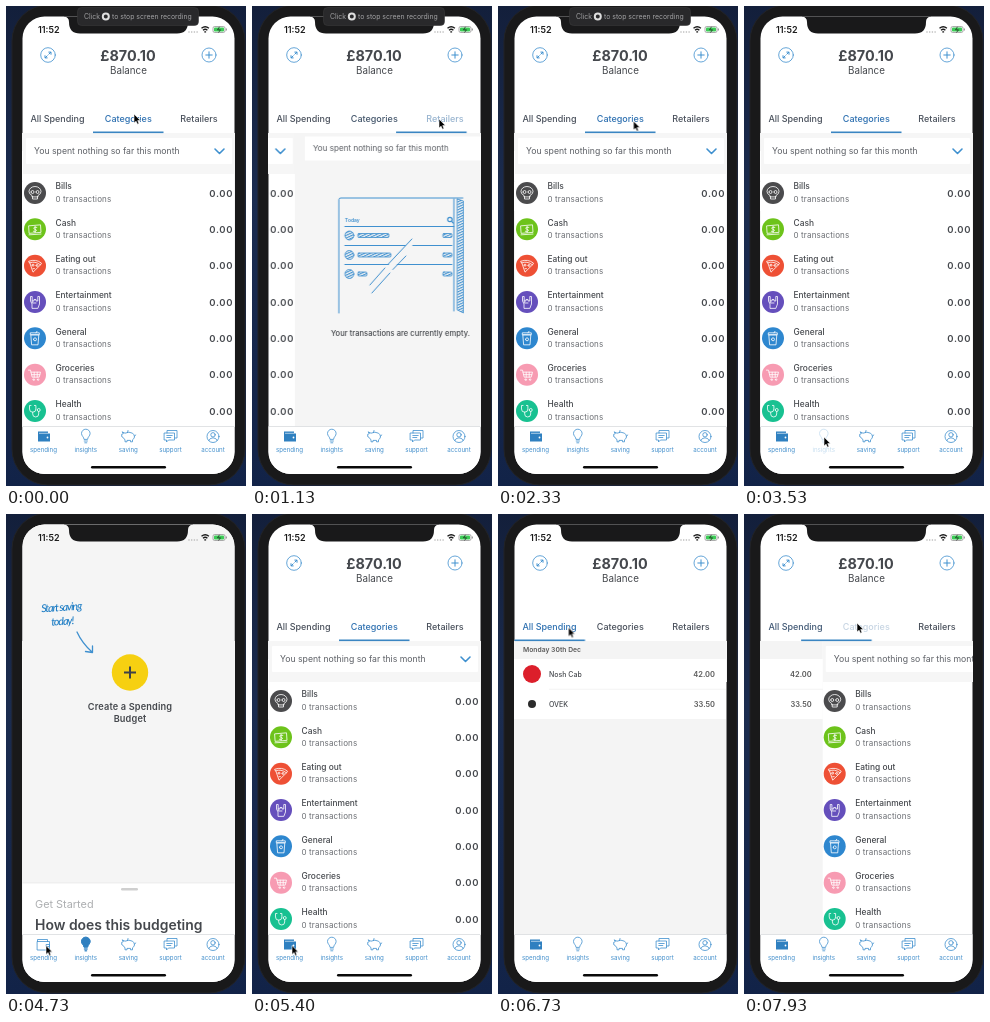
Recreate the animation shown at these times as an HTML page. Size 240 px wide and 480 px high, loop 7990 ms.

```html
<!DOCTYPE html>
<html lang="en">
<head>
<meta charset="utf-8">
<title>Spending app walkthrough</title>
<style>
html, body { margin: 0; width: 100%; height: 100%; overflow: hidden; background: #15213d; }
svg { display: block; }
text { font-family: Inter, "Open Sans", sans-serif; fill: #45484d; }
.mid { text-anchor: middle; }
.end { text-anchor: end; }
.line { fill: none; stroke: #3f90cf; stroke-linecap: round; stroke-linejoin: round; }
.thin { stroke-width: .8; }
.white { fill: none; stroke: #fff; stroke-width: .8; stroke-linecap: round; stroke-linejoin: round; }
.tab { font-size: 9px; font-weight: 500; text-anchor: middle; fill: #4a515c; }
.nav text { font-size: 6.2px; text-anchor: middle; fill: #4590cc; }
.name { font-size: 8.4px; font-weight: 500; }
.sub { font-size: 8px; letter-spacing: .15px; fill: #6a6d72; }
.sum { font-size: 9.5px; font-weight: 600; letter-spacing: .6px; }
.note { font-size: 8.7px; fill: #5c5f65; }
.shop { font-size: 7px; font-weight: 500; }
.paid { font-size: 7.5px; font-weight: 600; text-anchor: end; fill: #5a5a5a; }
.hand { font: italic 500 10.8px Lato, sans-serif; letter-spacing: -1.1px; fill: #1c7cc4; text-anchor: middle; }

/* One loop is 7990 ms for every part. */
.pager, .bar, .cursor, .pill, .tab, .insights, .press { animation: 7990ms linear infinite; }
.pager { animation-name: swipe; }
.bar { animation-name: bar; }
.pager, .bar { animation-timing-function: cubic-bezier(.65, 0, .35, 1); }
.cursor { animation-name: cursor; animation-timing-function: cubic-bezier(.45, 0, .4, 1); }
.pill { animation-name: pill; }
.all { animation-name: all-tap, all-on; }
.cat { animation-name: cat-tap, cat-on; }
.ret { animation-name: ret-tap, ret-on; }
.tab { animation-timing-function: linear, cubic-bezier(.65, 0, .35, 1); }
.insights, .press { animation-timing-function: step-end; }
.insights { animation-name: insights; }
.bulb { animation-name: bulb-tap; }
.wallet { animation-name: wallet-tap; }

@keyframes swipe {
  0%, 11.564% { transform: translateX(0); }
  15.319%, 24.155% { transform: translateX(-211px); }
  27.91%, 78.72% { transform: translateX(0); }
  82.48% { transform: translateX(211px); }
  97.08% { transform: translateX(211px); animation-timing-function: cubic-bezier(.333, 0, .667, 0); }
  98.957% { transform: translateX(105.5px); animation-timing-function: cubic-bezier(.333, .613, .667, .881); }
  100% { transform: translateX(9px); }
}
@keyframes bar {
  0%, 11.765% { transform: translateX(0); }
  15.52%, 24.356% { transform: translateX(70.5px); }
  28.11%, 78.924% { transform: translateX(0); }
  82.679% { transform: translateX(-70.5px); }
  97.285% { transform: translateX(-70.5px); animation-timing-function: cubic-bezier(.333, 0, .667, 0); }
  99.162% { transform: translateX(-35.25px); animation-timing-function: cubic-bezier(.333, .541, .667, .839); }
  100% { transform: translateX(-5.7px); }
}
@keyframes cursor {
  0%, 3.75% { transform: translate(128px, 108px); }
  10.64%, 16.9% { transform: translate(187px, 113px); }
  22.53%, 33.79% { transform: translate(135.5px, 115px); }
  42.55%, 53.44% { transform: translate(80px, 431px); }
  58.82%, 70.09% { transform: translate(40px, 431.5px); }
  76.72%, 80.1% { transform: translate(62px, 114px); }
  83.85%, 87.98% { transform: translate(70.5px, 113.5px); }
  90.99%, 100% { transform: translate(113px, 109px); }
}
@keyframes pill { 0%, 30.66% { opacity: 1; } 32.54%, 100% { opacity: 0; } }
@keyframes all-tap { 0%, 76.85% { opacity: 1; } 77.6%, 78.6% { opacity: .25; } 81.73%, 100% { opacity: 1; } }
@keyframes cat-tap {
  0%, 22.53% { opacity: 1; } 23.15%, 24.4% { opacity: .2; }
  27.53%, 95.87% { opacity: 1; } 96.62%, 99.25% { opacity: .28; } 100% { opacity: .4; }
}
@keyframes ret-tap {
  0%, 10.64% { opacity: 1; } 11.26%, 12.52% { opacity: .2; }
  14.14% { opacity: .5; } 15.77%, 100% { opacity: 1; }
}
@keyframes all-on { 0%, 78.924% { fill: #4a515c; } 82.679%, 98% { fill: #2f71b1; } 100% { fill: #485467; } }
@keyframes cat-on {
  0%, 11.765%, 28.11%, 78.924% { fill: #2f71b1; }
  15.52%, 24.356%, 82.679%, 98% { fill: #4a515c; }
  100% { fill: #316eaa; }
}
@keyframes ret-on { 0%, 11.765%, 28.11%, 100% { fill: #4a515c; } 15.52%, 24.356% { fill: #2f71b1; } }
@keyframes insights { 0%, 63.45%, 100% { visibility: hidden; } 45.93% { visibility: visible; } }
@keyframes bulb-tap { 0%, 45.93%, 100% { opacity: 1; } 43.8% { opacity: .3; } }
@keyframes wallet-tap { 0%, 63.45%, 100% { opacity: 1; } 62.58% { opacity: .4; } }
</style>
</head>
<body>
<svg width="240" height="480" viewBox="0 0 240 480">
  <defs>
    <linearGradient id="desk" x2="0" y2="1">
      <stop stop-color="#131f3b"/><stop offset=".4" stop-color="#1b2c4f"/><stop offset="1" stop-color="#122348"/>
    </linearGradient>
    <clipPath id="screen"><rect x="16.5" y="10.5" width="212" height="457.5" rx="22"/></clipPath>
    <pattern id="hatch" width="3" height="2.4" patternUnits="userSpaceOnUse" patternTransform="rotate(-25)">
      <rect width="3" height="1.1" fill="#3f90cf"/>
    </pattern>
    <path id="bulb" d="M78 433c0-2-2.5-3-2.5-5.500a4.300 4.300 0 0 1 8.600 0c0 2.500-2.500 3.500-2.500 5.500zM78.200 435h3.200M78.800 436.800h2"/>
  </defs>
  <rect width="240" height="480" fill="url(#desk)"/>
  <rect x="6" y="-1" width="233" height="480" rx="36" fill="#19191a" stroke="#222326"/>

  <g clip-path="url(#screen)">
    <rect x="16" y="10" width="213" height="459" fill="#fff"/>

    <g class="pager">
      <!-- All spending -->
      <g transform="translate(-211)">
        <rect x="16" y="127" width="212" height="294" fill="#f4f4f4"/>
        <rect x="16" y="145" width="212" height="60" fill="#fff"/>
        <path d="M51 175.3H228" stroke="#f0f0f0" stroke-width=".7"/>
        <text x="25" y="138" font-size="6.75" font-weight="600" style="fill:#5a5a5a">Monday 30th Dec</text>
        <circle cx="34" cy="160" r="9" fill="#dc1f2b"/>
        <text class="shop" x="51" y="162.7">Nosh Cab</text>
        <text class="paid" x="217" y="163">42.00</text>
        <circle cx="34" cy="190" r="4" fill="#2b2b2b"/>
        <text class="shop" x="51" y="192.7">OVEK</text>
        <text class="paid" x="217" y="193">33.50</text>
      </g>

      <!-- Categories -->
      <rect x="17" y="127" width="211" height="41" fill="#f6f6f6"/>
      <rect x="20" y="132" width="206" height="26" rx="1" fill="#fff"/>
      <text class="note" x="28" y="148">You spent nothing so far this month</text>
      <path class="line" stroke-width="1.6" d="M209 143l4.500 4.500 4.500-4.500"/>
      <g id="rows"></g>

      <!-- Retailers -->
      <g transform="translate(211)">
        <rect x="17" y="127" width="213" height="294" fill="#f5f5f5"/>
        <rect x="27" y="130.5" width="203" height="24" fill="#fff"/>
        <text class="note" x="35" y="145" style="font-size:8.100px">You spent nothing so far this month</text>
        <g class="line" transform="translate(-26)">
          <path d="M87 307V193.500Q87 192 89 192H211M202 193V305M93 220.500H202M93 239.500H200M93 258.500H200"/>
          <path class="thin" d="M205.500 193L211.500 195V307L205.500 304Z" fill="url(#hatch)"/>
          <g class="thin" fill="url(#hatch)">
            <circle cx="97.500" cy="229.500" r="4.500"/><circle cx="97.500" cy="249" r="4.500"/><circle cx="97.500" cy="268" r="4.500"/>
            <rect x="106" y="227.500" width="31" height="4" rx="1"/><rect x="106" y="247" width="33" height="4" rx="1"/>
            <rect x="106" y="266" width="9" height="4" rx="1"/>
            <rect x="191" y="227.500" width="9" height="4" rx="1"/><rect x="191" y="247" width="9" height="4" rx="1"/>
            <rect x="191" y="266" width="9" height="4" rx="1"/>
          </g>
          <circle cx="198" cy="213.500" r="2.200" stroke-width="1.200"/><path stroke-width="1.200" d="M199.700 215.300l1.600 1.700"/>
          <path d="M119 279L157 236l4 4-41 47z" fill="#f5f5f5" stroke="none"/>
          <path d="M118 279L133 262M136 258.500L160 233M120 287L138 267M141 263.500L154 250"/>
        </g>
        <text x="67" y="216" font-size="5" font-weight="600" style="fill:#3f90cf">Today</text>
        <text class="mid" x="122.500" y="330" font-size="7.600" font-weight="500">Your transactions are currently empty.</text>
      </g>
    </g>

    <!-- Header -->
    <g class="line">
      <circle class="thin" cx="42" cy="49" r="7.300"/>
      <path d="M39.200 51.800l2-2M42.800 48.200l2-2M42.800 46.100H45V48.300M39 49.700V51.900H41.200"/>
      <circle class="thin" cx="203" cy="49" r="7"/>
      <path d="M199.800 49h6.400M203 45.800v6.400"/>
    </g>
    <text class="mid" x="122" y="54.500" font-size="14.400" font-weight="700">£870.10</text>
    <text class="mid" x="122.500" y="67.500" font-size="9.800">Balance</text>
    <text class="tab all" x="51.500" y="116.300">All Spending</text>
    <text class="tab cat" x="122.300" y="116.300">Categories</text>
    <text class="tab ret" x="193" y="116.300">Retailers</text>
    <rect class="bar" x="87" y="125.500" width="70.500" height="1.600" fill="#3a85c2"/>

    <!-- Insights page -->
    <g class="insights">
      <rect x="16" y="10" width="213" height="411" fill="#f5f5f5"/>
      <g transform="rotate(-4 55 98)">
        <text class="hand" x="55.500" y="97">Start saving</text>
        <text class="hand" x="55.500" y="111">today!</text>
      </g>
      <path class="line" stroke-width="1.300" d="M71 118Q76 129 86 138M86.500 132V138.500L79.500 137.500"/>
      <circle cx="124" cy="158.500" r="18.200" fill="#f6d011"/>
      <path d="M118 158.500h12M124 152.500v12" stroke="#3d4148" stroke-width="2"/>
      <g class="mid" font-size="9.200" font-weight="600" letter-spacing=".15">
        <text x="124" y="195.500">Create a Spending</text>
        <text x="124" y="208">Budget</text>
      </g>
      <rect x="16" y="368" width="213" height="2" fill="#efefef"/>
      <rect x="16" y="369.500" width="213" height="52" fill="#fff"/>
      <rect x="115" y="374" width="17" height="2.500" rx="1.250" fill="#cfcfcf"/>
      <text x="29" y="394.300" font-size="10.900" style="fill:#adafb1">Get Started</text>
      <text x="29" y="416" font-size="13.950" font-weight="600">How does this budgeting</text>
    </g>

    <!-- Tab bar -->
    <rect x="16" y="420.500" width="213" height="48" fill="#fff"/>
    <path d="M16 420.500H229" stroke="#dadcdf" stroke-width=".8"/>
    <g class="nav">
      <g class="press wallet">
        <path d="M32 425.500h10v2h2v8H32z" fill="#2f80c0"/>
        <path d="M33 427.300h9" stroke="#fff" stroke-width=".6"/><circle cx="41.500" cy="431.500" r=".9" fill="#fff"/>
        <g class="insights">
          <rect x="30" y="423" width="16" height="15" fill="#fff"/>
          <path class="line thin" d="M31.500 427.500h12v8.500h-12zM31.500 427.500v-2h10v2M40.500 430.500h3v2h-3z"/>
        </g>
        <text x="37.500" y="445.500">spending</text>
      </g>
      <g class="press bulb">
        <use href="#bulb" class="line thin"/>
        <g class="insights"><use href="#bulb" fill="#2f80c0" stroke="#2f80c0"/></g>
        <text x="79.700" y="445.500">insights</text>
      </g>
      <path class="line thin" d="M116.500 426l2.500 1.200q4-2 7.500 0 2 1.300 2 3.800-.5 2-2 2.800v2h-2v-1.400h-3.500v1.400h-2v-2.200q-1.500-.8-2-2.300l-1.300-.7v-2.300l1.300-.5zM128.500 430l1.300-1M121.500 426.500l.5-2"/>
      <text x="122.300" y="445.500">saving</text>
      <path class="line thin" d="M161 427v-2.500h10v7.500h-2M158.500 427h10v7h-6l-2 2v-2h-2zM160.800 429.500h5.400M160.800 431.500h4"/>
      <text x="164.500" y="445.500">support</text>
      <g class="line thin"><circle cx="207" cy="430.500" r="6"/><circle cx="207" cy="428.800" r="2.200"/><path d="M202.800 434.500q1-2.700 4.200-2.700t4.200 2.700"/></g>
      <text x="207" y="445.500">account</text>
    </g>
    <rect x="85" y="460" width="75" height="2.600" rx="1.300" fill="#0a0a0a"/>

    <!-- Status bar -->
    <text x="32" y="26.500" font-size="9" font-weight="600" style="fill:#1a1a1a">11:52</text>
    <path d="M183 26h10" stroke="#b5b5b5" stroke-width="1.600" stroke-linecap="round" stroke-dasharray="0 2.700"/>
    <g fill="none" stroke="#1a1a1a" stroke-width="1.300">
      <path d="M195.500 22.300q3.700-3.200 7.400 0M197 24.200q2.200-1.900 4.400 0"/><path d="M198.300 25.900h1.800"/>
    </g>
    <rect x="207" y="20.500" width="12" height="6" rx="1.600" fill="none" stroke="#888" stroke-width=".7"/>
    <rect x="208" y="21.500" width="10" height="4" rx=".8" fill="#3ccb56"/>
    <path d="M213.500 20.800l-2 3h3l-2 2.700" fill="none" stroke="#1a1a1a" stroke-width=".7"/>
    <path d="M220.300 22.500v2" stroke="#888"/>
    <path d="M58 10H187V10.500Q182 11 182 16 182 27.500 171 27.500H74Q63 27.500 63 16 63 11 58 10.500Z" fill="#19191a"/>
  </g>

  <g class="pill">
    <rect x="71.500" y="1.500" width="121" height="18" rx="4" fill="#29292b" stroke="#3a3a3c" stroke-width=".6"/>
    <g font-size="6.900">
      <text x="78" y="13" style="fill:#a2a2a4">Click</text>
      <text x="106" y="13" style="fill:#a2a2a4">to stop screen recording</text>
    </g>
    <circle cx="99.800" cy="10.500" r="3" fill="none" stroke="#dedede" stroke-width="2"/>
  </g>

  <path class="cursor" d="M0 0V9L2.100 7.200 3.500 10.200 5 9.500 3.700 6.600H6.400Z" fill="#000" stroke="#fff" stroke-width=".6"/>
</svg>
<script>
// Icons are drawn around the centre of their disc.
const categories = [
  ["Bills", "#4b4b4d", "M-3 3.500V2.500Q-6 1-6-1.500A6 5 0 0 1 6-1.500Q6 1 3 2.500V3.500ZM-2.500 3.500V6H2.500V3.500M-4-1a1.500 1.500 0 1 0 3 0a1.500 1.500 0 1 0-3 0M1-1a1.500 1.500 0 1 0 3 0a1.500 1.500 0 1 0-3 0"],
  ["Cash", "#6dc31b", "M-6-3.500L5.500-4.500 6 3-5.500 4ZM-6 5.500L6 4.700M1.800-2Q-1.500-2.800-1.300-.9 0 .1 1.500.8 1.500 2.700-1.700 2M.1-3V3.200"],
  ["Eating out", "#ee5035", "M-6-4.500Q1-7 6.500-2.500L5.500-.8Q0-5-5.200-2.800ZM-5.200-2.800L-2 6.500 5.500-.8M-3-.5a1 1 0 1 0 2 0a1 1 0 1 0-2 0M1-.2a1 1 0 1 0 2 0a1 1 0 1 0-2 0M-2 3h1.500"],
  ["Entertainment", "#654fbc", "M-3 6V2L-4.500-1V-5.500H-2.800V-1H-1V-2.500H1V-1H2.800V-5.500H4.500V2L3 6ZM-2.800-1V1H1"],
  ["General", "#2e87cf", "M-3.800-3.500H3.800L3 6.500H-3ZM-4.300-5.500H4.300V-3.500H-4.300ZM-1.500 1a1.500 1.500 0 1 0 3 0a1.500 1.500 0 1 0-3 0M1-5.500L2-7"],
  ["Groceries", "#f79bb2", "M-6.500-4.500H-4.500L-2.800 2.500H4.200L5.500-2.500H-4M-3.300 0H4.800M-.8-2.500V2.500M2.200-2.500V2.500M-2 5a.8.8 0 1 0 1.600 0a.8.8 0 1 0-1.600 0M2.300 5a.8.8 0 1 0 1.600 0a.8.8 0 1 0-1.600 0"],
  ["Health", "#18c191", "M-4-5.500H-5.500V-2A3.200 3.200 0 0 0 .9-2V-5.500H-.6M-2.300 1.200V3A3 3 0 0 0 3.700 3V.5M2.200-1a1.500 1.500 0 1 0 3 0a1.500 1.500 0 1 0-3 0"]
];
document.getElementById("rows").innerHTML = categories.map(([name, color, icon], i) => `
  <g transform="translate(0 ${187 + i * 36.33})">
    <circle cx="29" r="11" fill="${color}"/>
    <path class="white" transform="translate(29)" d="${icon}"/>
    <text class="name" x="49.500" y="-3.700">${name}</text>
    <text class="sub" x="49.500" y="8.800">0 transactions</text>
    <text class="sum end" x="227" y="3.800">0.00</text>
  </g>`).join("");
</script>
</body>
</html>
```
